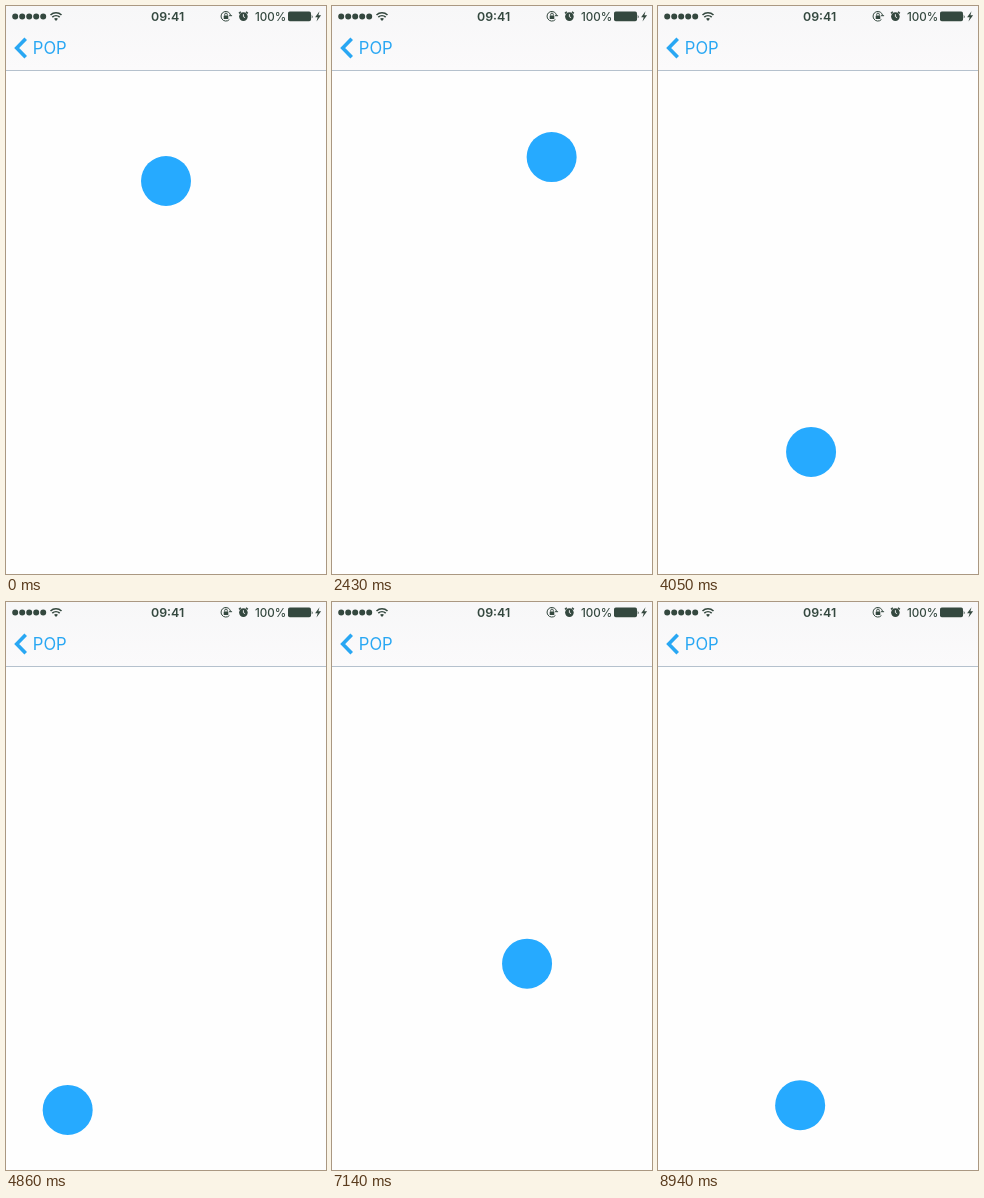
Recreate the animation shown at these times as an HTML page. Size 320 px wide and 568 px high, loop 8970 ms.

```html
<!DOCTYPE html>
<html lang="en">
<meta charset="utf-8">
<title>Spring ball</title>
<style>
  html, body { margin: 0; width: 100%; height: 100%; overflow: hidden; background: #fefefe; }
  svg { display: block; width: 100vw; height: 100vh; }
  text { font-family: Inter, Roboto, sans-serif; }
</style>
<svg viewBox="0 0 320 568">
  <defs>
    <linearGradient id="bar" x2="0" y2="1">
      <stop stop-color="#f7f7f8"/>
      <stop offset="1" stop-color="#fbfafb"/>
    </linearGradient>
  </defs>
  <rect width="320" height="568" fill="#fefefe"/>
  <rect width="320" height="64" fill="url(#bar)"/>
  <rect y="64" width="320" height="1" fill="#b5c1cd"/>

  <g fill="#34483f">
    <path d="M9.2 10.5H38" stroke="#34483f" stroke-width="6" stroke-linecap="round" stroke-dasharray="0 7"/>
    <text x="145" y="14.5" font-size="12.4" font-weight="600">09:41</text>
    <text x="249" y="14.5" font-size="11.6" font-weight="500">100%</text>
    <path d="M50 15l-2-2.2a3 3 0 0 1 4 0z"/>
    <rect x="217.7" y="9.5" width="4.6" height="3.6" rx=".5"/>
    <circle cx="237.4" cy="10.6" r="4.3"/>
    <rect x="282" y="5.5" width="23" height="9.8" rx="1.8"/>
    <path d="M305.7 8.5q1.8 2 0 4zM313.5 5.2l-4.4 6h2.6l-1.2 4.3 4.6-6.2h-2.7z"/>
  </g>
  <g fill="none" stroke="#34483f">
    <path d="M44.5 9a8 8 0 0 1 11 0M46.3 11.2a5.5 5.5 0 0 1 7.4 0" stroke-width="1.6"/>
    <path d="M224.6 9.5a4.8 4.8 0 1 0-1.2 4M222.9 9.7h3.2M218.7 9.5V8.4a1.3 1.3 0 0 1 2.6 0v1.1"/>
    <path d="M233 7.4l1.8-1.6M241.8 7.4l-1.8-1.6" stroke-width="1.5"/>
    <path d="M237.4 8.2v2.5l1.7 1" stroke="#f8f8f8" stroke-width=".9"/>
  </g>

  <path d="M19.7 32.8l-9 9.2 9 9.2" fill="none" stroke="#29a7f3" stroke-width="3.6"/>
  <text x="26.8" y="48" font-size="16.6" fill="#29a7f3">POP</text>
  <circle id="ball" r="25" fill="#26aaff"/>
</svg>
<script>
  const LOOP = 8970, DAMPING = 0.006, FREQ = Math.PI / 400;
  const home = { x: 160, y: 175 };
  // Each tap sends the ball springing to a new place.
  const taps = [
    { t: 710, x: 143, y: 372 },
    { t: 1712, x: 220, y: 150 },
    { t: 3075, x: 193, y: 262 },
    { t: 3800, x: 150, y: 460 },
    { t: 4455, x: 69, y: 504 },
    { t: 5193, x: 62, y: 303 },
    { t: 5930, x: 210, y: 180 },
    { t: 6480, x: 195, y: 361 },
    { t: 7330, x: 180, y: 478 },
    { t: 7950, x: 200, y: 230 },
    { t: 8540, x: 147, y: 480 }
  ];

  // Underdamped step response, from 0 to 1 with a small overshoot
  function spring(t) {
    if (t <= 0) return 0;
    const a = FREQ * t;
    return 1 - Math.exp(-DAMPING * t) * (Math.cos(a) + DAMPING / FREQ * Math.sin(a));
  }

  // Adding the responses keeps the speed continuous at every tap.
  function position(t, axis) {
    let from = home[axis], sum = from;
    for (const tap of taps) {
      sum += (tap[axis] - from) * spring(t - tap.t);
      from = tap[axis];
    }
    return sum;
  }

  const ball = document.getElementById("ball");
  const start = performance.now();
  function draw(now) {
    const t = Math.max(0, now - start) % LOOP;
    ball.setAttribute("cx", position(t, "x"));
    ball.setAttribute("cy", position(t, "y"));
    requestAnimationFrame(draw);
  }
  draw(start);
</script>
</html>
```
